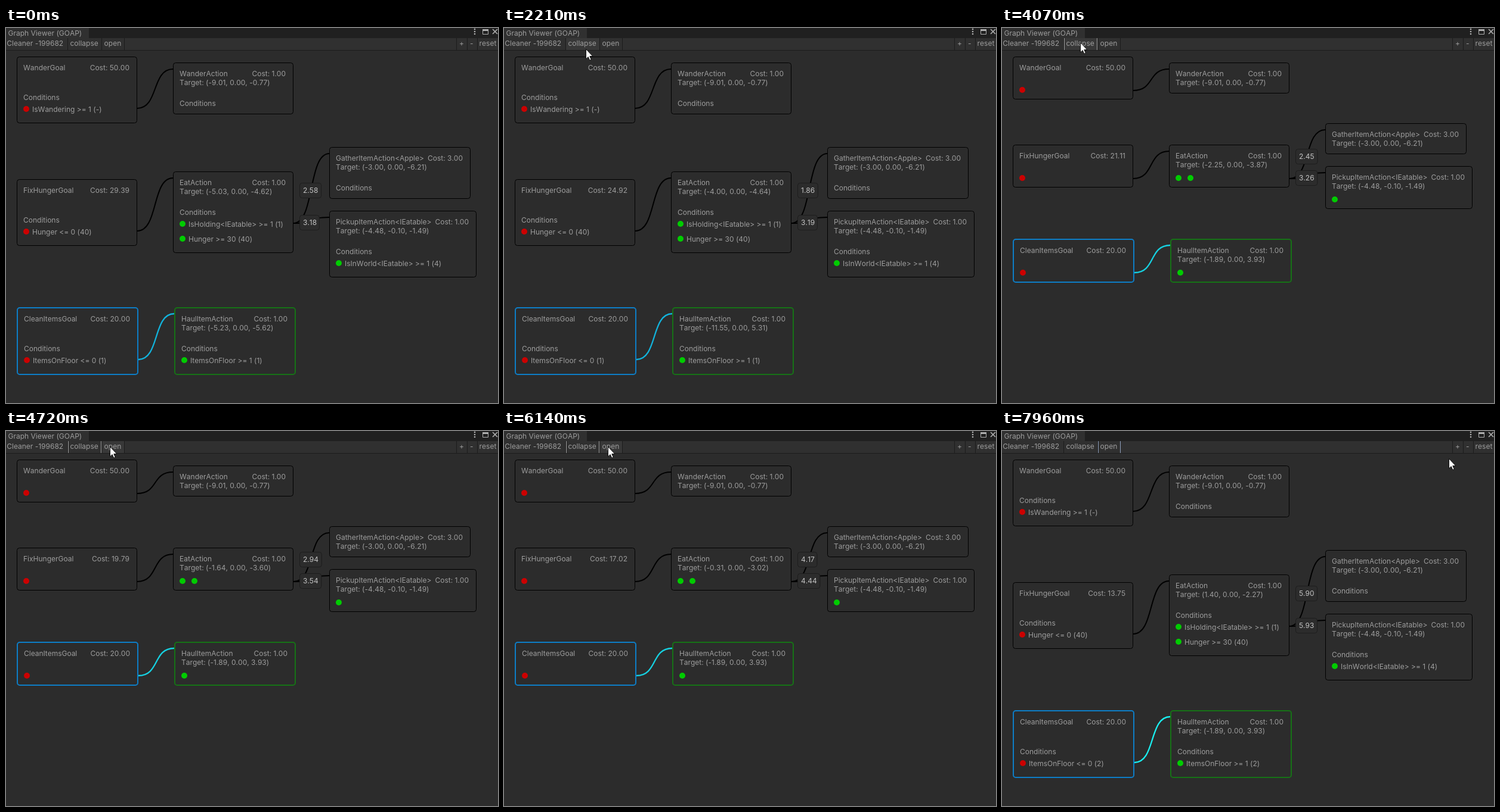
Recreate the animation shown at these times as an HTML page. Size 825x630 px, loop 8 s.

```html
<!DOCTYPE html>
<html lang="en">
<head>
<meta charset="utf-8">
<title>Graph Viewer</title>
<style>
  html, body { margin: 0; width: 825px; height: 630px; overflow: hidden; background: #2c2c2c; }
  svg { display: block; }
  text {
    font: 12px Inter, sans-serif;
    font-kerning: none;
    font-feature-settings: "calt" 0, "kern" 0;
    fill: #9d9d9d;
  }
</style>
</head>
<body>
<svg id="stage" width="825" height="630"></svg>
<script>
const stage = document.getElementById('stage');
const ruler = document.createElement('canvas').getContext('2d');
const LOOP = 8, COLLAPSE_AT = 3.76, OPEN_AT = 6.2, PICK_AT = 1, NEW_ITEM_AT = 2.8;
const BG = '#2c2c2c', BAR = '#303030', LINE = '#1c1c1c', ICON = '#b0b0b0', RED = '#cc0000', GREEN = '#00cc00';

const escapeText = s => s.replace(/</g, '&lt;').replace(/>/g, '&gt;');
const text = (s, x, y, style = '') => `<text x="${x}" y="${y}" style="${style}">${escapeText(s)}</text>`;
const rect = (color, x, y, w, h) => `<rect x="${x}" y="${y}" width="${w}" height="${h}" fill="${color}"/>`;
const dot = (color, x, y, r = 5) => `<circle cx="${x}" cy="${y}" r="${r}" fill="${color}"/>`;
const path = (d, color, width, fill = 'none') =>
  `<path d="${d}" stroke="${color}" stroke-width="${width}" fill="${fill}"/>`;
const frame = (x, y, w, h, line, color) =>
  `<rect x="${x + line / 2}" y="${y + line / 2}" width="${w - line}" height="${h - line}" rx="4"
    fill="${BG}" stroke="${color}" stroke-width="${line}"/>`;

// Walks to the item, stops to pick it up, then carries it off in a straight line.
function agentAt(t) {
  const approach = Math.min(t / .52, 1), carry = Math.max(t - PICK_AT, 0);
  return [-5.03 - .108 * approach + .939 * carry, 0, -4.62 - .518 * approach + .412 * carry];
}

const hungerCost = t => 29.39 - t * (2.035 - .0045 * (t - 4) ** 2);

// Each glide: start, duration, destination.
const GLIDES = [
  [1.53, .94, 134, 32], [2.6, .35, 163, 29], [3.34, .26, 131, 24], [4.11, .49, 174, 26], [7.36, .4, 749, 46]
];

function pointerAt(t) {
  if (t < GLIDES[0][0]) return null;
  let x = 648, y = 622;
  for (const [start, duration, toX, toY] of GLIDES) {
    const p = Math.min(Math.max((t - start) / duration, 0), 1), eased = 1 - (1 - p) ** 4;
    x += (toX - x) * eased;
    y += (toY - y) * eased;
  }
  return [Math.round(x), Math.round(y)];
}

function nodeSvg(n, open) {
  const rows = n.rows || [], b = n.border ? 1 : 0, x = n.x + b, y = n.y + b;
  const h = (open ? 87 + 25 * rows.length : rows.length ? 72 : 52) + 2 * b;
  let out = frame(n.x, n.y, n.w, h, 1 + b, n.border || '#000')
    + text(n.title, x + 11, y + 23)
    + text('Cost: ' + n.cost.toFixed(2), n.x + n.w - 13 - b, y + 23, 'text-anchor: end');
  if (n.target) out += text(`Target: (${n.target.map(v => v.toFixed(2)).join(', ')})`, x + 11, y + 38);
  if (open) out += text('Conditions', x + 11, y + 73);
  rows.forEach(([color, label], i) => {
    out += open
      ? dot(color, x + 16, y + 88 + 25 * i) + text(label, x + 26, y + 93 + 25 * i)
      : dot(color, x + 16 + 20 * i, y + 56);
  });
  return out;
}

function edge(from, to, open) {
  const x1 = from.x + from.w, x2 = to.x, bend = (x2 - x1) * .6;
  const y1 = from.y + (open ? 87 : 57) + (from.border && open ? 1 : 0), y2 = to.y + 11;
  return { d: `M${x1} ${y1}C${x1 + bend} ${y1} ${x2 - bend} ${y2} ${x2} ${y2}`, mid: (y1 + y2) / 2 };
}

function badge(value, mid) {
  const label = value.toFixed(2), y = Math.floor(mid) - 9;
  ruler.font = '12px Inter, sans-serif';
  return frame(492, y, ruler.measureText(label).width + 12, 26, 1, '#1d1d1d')
    + text(label, 498, y + 17, 'fill: #c4c4c4');
}

function graph(t, open) {
  const agent = agentAt(t), floor = t < NEW_ITEM_AT ? 1 : 2;
  const item = t < PICK_AT ? [-5.23, 0, -5.62] : t < NEW_ITEM_AT ? [-11.55, 0, 5.31] : [-1.89, 0, 3.93];
  const top = (opened, collapsed) => open ? opened : collapsed;

  const wanderGoal = { x: 18, y: 48, w: 202, title: 'WanderGoal', cost: 50, rows: [[RED, 'IsWandering >= 1 (-)']] };
  const wander = { x: 280, y: 58, w: 202, title: 'WanderAction', cost: 1, target: [-9.01, 0, -.77] };
  const hungerGoal = {
    x: 18, y: top(254, 196), w: 202, title: 'FixHungerGoal', cost: hungerCost(t), rows: [[RED, 'Hunger <= 0 (40)']]
  };
  const eat = {
    x: 280, y: top(241, 196), w: 202, title: 'EatAction', cost: 1, target: agent,
    rows: [[GREEN, 'IsHolding<IEatable> >= 1 (1)'], [GREEN, 'Hunger >= 30 (40)']]
  };
  const gather = {
    x: 542, y: top(200, 160), w: 237, title: 'GatherItemAction<Apple>', cost: 3, target: [-3, 0, -6.21]
  };
  const pickup = {
    x: 542, y: top(307, 232), w: 247, title: 'PickupItemAction<IEatable>', cost: 1,
    target: [-4.48, -.1, -1.49], rows: [[GREEN, 'IsInWorld<IEatable> >= 1 (4)']]
  };
  const cleanGoal = {
    x: 18, y: top(469, 354), w: 204, title: 'CleanItemsGoal', cost: 20, border: '#0d7dc6',
    rows: [[RED, `ItemsOnFloor <= 0 (${floor})`]]
  };
  const haul = {
    x: 282, y: top(469, 354), w: 204, title: 'HaulItemAction', cost: 1, border: '#167216',
    target: item, rows: [[GREEN, `ItemsOnFloor >= 1 (${floor})`]]
  };

  const active = t < COLLAPSE_AT ? '#12b3dc' : t < OPEN_AT ? '#16d0e0' : '#1aeff0';
  const toGather = edge(eat, gather, open), toPickup = edge(eat, pickup, open);
  const plain = [edge(wanderGoal, wander, open), edge(hungerGoal, eat, open), toGather, toPickup];
  const nodes = [wanderGoal, wander, hungerGoal, eat, gather, pickup, cleanGoal, haul];
  const distance = node => Math.hypot(...node.target.map((v, i) => v - agent[i]));

  return plain.map(e => path(e.d, '#000', 2)).join('')
    + path(edge(cleanGoal, haul, open).d, active, 2.3)
    + nodes.map(n => nodeSvg(n, open)).join('')
    + badge(distance(gather), toGather.mid)
    + badge(distance(pickup), toPickup.mid);
}

function header(t, pointer) {
  const bars = (color, xs) => xs.map(x => rect(color, x, 17, 1, 20)).join('');
  let out = rect('#202020', 0, 0, 825, 17) + rect(BAR, 0, 0, 139, 17) + rect(BAR, 0, 17, 825, 20)
    + rect(LINE, 0, 37, 825, 1) + text('Graph Viewer (GOAP)', 3.5, 13);

  if (pointer && pointer[1] < 37 && pointer[0] < 198) {
    out += pointer[0] < 160 ? rect('#383838', 104, 17, 56, 20) : rect('#383838', 161, 17, 37, 20);
  }
  out += bars(LINE, [103, 160, 198, 755, 773, 790]);
  if (t >= OPEN_AT) out += bars('#8fa0bd', [161, 198]);
  else if (t >= COLLAPSE_AT) out += bars('#a0a0a0', [104, 159]);

  return out
    + text('Cleaner -199682', 1.3, 30) + text('collapse', 107.5, 30) + text('open', 164.6, 30)
    + text('+', 760, 30) + text('-', 778, 30) + text('reset', 793.6, 30)
    + [2, 6, 10].map(y => dot(ICON, 786, y, 1.3)).join('')
    + path('M799.5 2.5h9v8h-9z', ICON, 1) + rect(ICON, 799, 2, 10, 3)
    + path('M816 2l8 8M824 2l-8 8', ICON, 1.6);
}

const arrow = ([x, y]) => `<g transform="translate(${x} ${y})">`
  + path('M.5 .5V17L4.2 13.5L6.8 19.3L9.3 18.2L6.8 12.5H11.8Z', '#111', 1, '#fff') + '</g>';

const start = performance.now();
function draw(now) {
  const t = Math.max(0, now - start) / 1000 % LOOP;
  const pointer = pointerAt(t);
  stage.innerHTML = graph(t, t < COLLAPSE_AT || t >= OPEN_AT) + header(t, pointer) + (pointer ? arrow(pointer) : '');
  requestAnimationFrame(draw);
}
draw(start);
</script>
</body>
</html>
```
